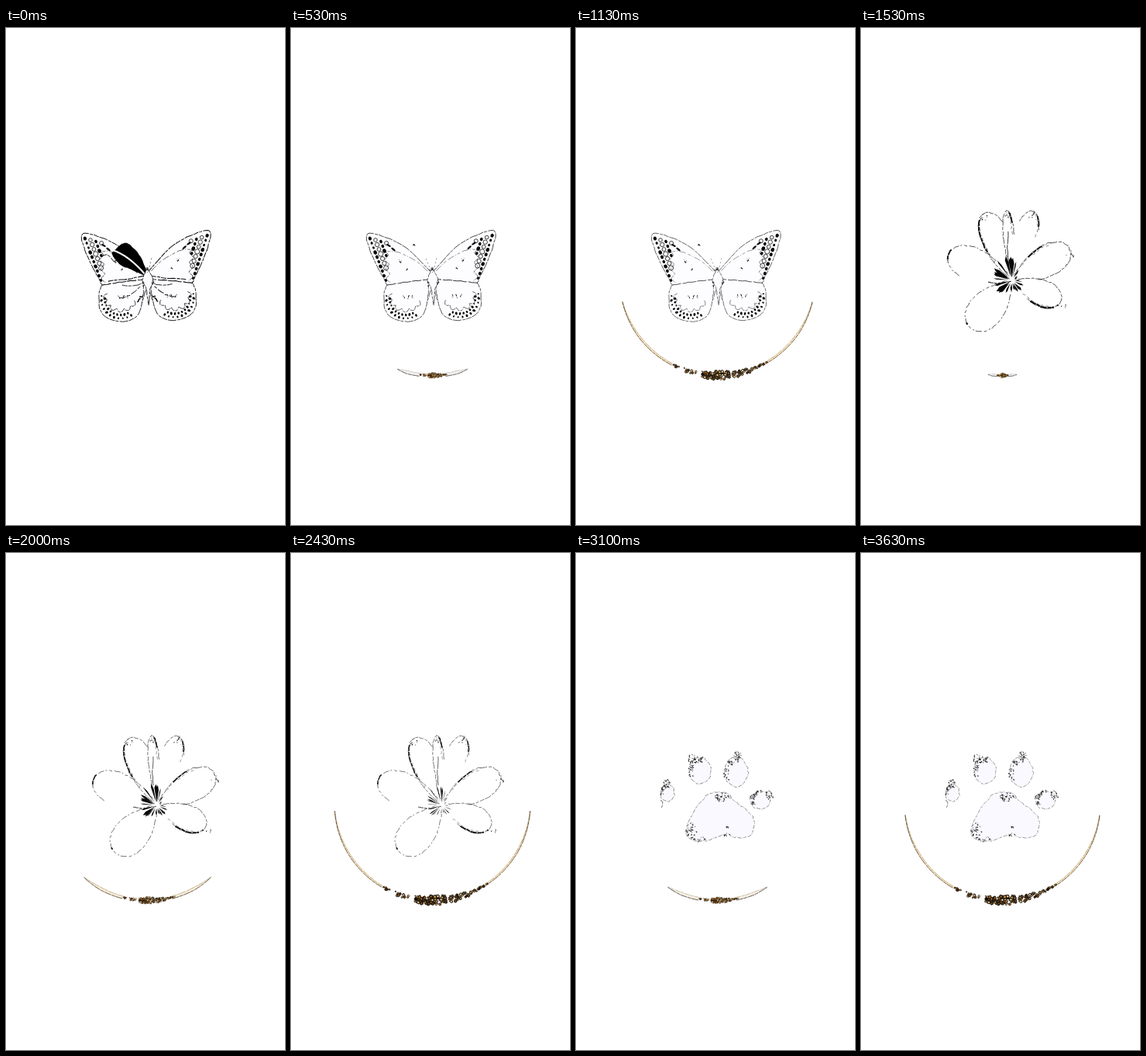
An HTML page that plays this animation: 360x640 px, repeating every 3.66 s.

```html
<!DOCTYPE html>
<html lang="en">
<head>
<meta charset="utf-8">
<title>Butterfly, flower, paw</title>
<style>
html, body { margin: 0; width: 100%; height: 100%; overflow: hidden; background: #fff; }
svg { display: block; width: 100vw; height: 100vh; }
.ink { fill: none; stroke: #111; stroke-linejoin: round; }
.bead { stroke: #1a1006; }
</style>
</head>
<body>
<svg id="stage" viewBox="0 0 360 640" xmlns="http://www.w3.org/2000/svg"></svg>
<script>
const LOOP = 3660, PART = LOOP / 3, TURN = Math.PI * 2;
const CX = 182.5, CY = 321, R = 126.5, SPAN = 86;

let seed = 11;
const rnd = () => (seed = (seed * 16807) % 2147483647) / 2147483647;
const spread = a => (rnd() * 2 - 1) * a;
const f = n => n.toFixed(1);
const mix = (a, b, t) => a + (b - a) * t;
const clamp = v => Math.max(0, Math.min(1, v));

// Path through n + 1 points given by a function of 0..1
function trace(point, n, rough = 0) {
  let d = '';
  for (let i = 0; i <= n; i++) {
    const [x, y] = point(i / n);
    d += (i ? 'L' : 'M') + f(x + spread(rough)) + ' ' + f(y + spread(rough));
  }
  return d;
}

// Slightly rough spline through a few key points
function curve(text, rough = 0.4) {
  const p = text.split(' ').map(s => s.split(',').map(Number)), n = p.length - 1;
  const at = i => p[Math.max(0, Math.min(n, i))];
  return trace(t => {
    const i = Math.min(n - 1, Math.floor(t * n)), u = t * n - i;
    const [a, b, c, e] = [at(i - 1), at(i), at(i + 1), at(i + 2)];
    return [0, 1].map(k => b[k] + 0.5 * u * (c[k] - a[k] + u * (2 * a[k] - 5 * b[k] + 4 * c[k] - e[k]
      + u * (3 * b[k] - a[k] - 3 * c[k] + e[k]))));
  }, n * 6, rough);
}

const ink = (d, w = 1, dash = '7 1 4 1.5 11 1', color = '#111') =>
  `<path class="ink" d="${d}" style="stroke:${color};stroke-width:calc(var(--w)*${w}px)" stroke-dasharray="${dash}"/>`;
const solid = (d, color = '#000') => `<path d="${d}" fill="${color}"/>`;
const spot = (x, y, rx, ry, rot = 0, open = false) =>
  `<ellipse transform="translate(${f(x)} ${f(y)}) rotate(${f(rot)})" rx="${f(rx)}" ry="${f(ry)}"`
  + (open ? ' class="ink" stroke-width=".8"/>' : ' fill="#080808"/>');

// Little marks scattered over an ellipse, or round its rim
function specks(cx, cy, rx, ry, n, rim = false) {
  let d = '';
  for (let i = 0; i < n; i++) {
    const a = rim ? 3.7 + spread(1.2) : rnd() * TURN, r = rim ? 0.9 + spread(0.22) : Math.sqrt(rnd());
    const w = 0.5 + rnd(), h = 0.5 + rnd() * 1.6;
    d += `M${f(cx + rx * r * Math.cos(a))} ${f(cy + ry * r * Math.sin(a))}h${f(w)}l${f(spread(0.8))} ${f(h)}h-${f(w)}z`;
  }
  return solid(d, '#222');
}

function wing() {
  const upper = curve('180,314 150,284 118,268 98,266 102,286 113,310 124,331');
  const lower = curve('124,331 120,344 124,368 147,378 169,371 177,349 180,338');
  let s = solid(upper + 'L180 324Z', '#fdfdff') + solid(lower + 'L178 325Z', '#fdfdff');
  s += ink(upper) + ink(lower, 0.9);
  s += ink(curve('124,331 150,327 177,324'), 1.1, '12 2 18 1');
  s += ink(curve('124,288 136,288 160,299 178,315'), 0.6, '4 2 1 2 9 3');
  s += ink(trace(t => [mix(123, 126, t) + 2.5 * Math.sin(t * 20), mix(289, 328, t)], 24, 0.3), 0.7);
  s += ink(curve('177,324 178,332 176,351'), 0.8);
  s += ink(trace(t => {
    const a = 0.3 + t * 3.1, r = 16 + 4 * Math.abs(Math.sin(t * Math.PI * 6));
    return [148 + (r + 2) * Math.cos(a), 346 + r * Math.sin(a)];
  }, 48, 0.3), 0.8);

  // Rows of dots and rings inside the outer margin
  for (let row = 0; row < 4; row++)
    for (let y = 271 + row * 2; y < 328; y += 6) {
      const x = 100 + (y - 266) * 0.38 + row * 6.3;
      if (x > (y < 283 ? 126 : 124)) continue;
      const r = 1.4 + rnd() * 0.9;
      s += row % 2 ? spot(x, y, r + 0.8, r + 0.8, 0, true) : spot(x, y, r, r * 1.2, -25);
    }
  s += spot(126, 280, 3.2, 1.2, 30) + spot(132, 285, 3.2, 1.2, 38);
  for (let row = 0; row < 2; row++)
    for (let a = 1 + row * 0.1; a < 3.4; a += 0.23) {
      const r = 25 - row * 4.5, size = 0.9 + rnd() * 0.8;
      s += spot(148 + r * Math.cos(a), 349 + r * Math.sin(a), size * 1.2, size * 0.9, a * 57 + spread(40));
    }
  return s + specks(141, 299, 2, 2, 4) + specks(150, 310, 3, 1.5, 4) + specks(152, 346, 9, 3, 10);
}

function butterfly() {
  const half = wing(), mirror = 'rotate(-2.7 182 322) matrix(-1 0 0 1 364 0)';
  const both = s => s + `<g transform="${mirror}">${s}</g>`;
  const veins = both(ink(curve('132,326 158,323 180,319'), 1.1) + ink(curve('150,331 163,332 177,329'), 0.9)
    + ink(curve('146,348 160,344 173,333'), 1, '9 2 4 2') + ink(curve('170,354 173,347 177,345', 0.8), 1.6))
    + ink(trace(t => [mix(124, 176, t), mix(294, 319, t) - 5 * Math.abs(Math.sin(t * 11))], 30, 0.3), 1);
  const lobe = solid(curve('136,290 148,279 158,278 174,295 181,318 162,311 146,304 136,290'))
    + '<path d="M137 286Q158 292 181 319" fill="none" stroke="#fff" stroke-width="2.2"/>';
  const body = curve('182,309 186,316 190,326 186,336 184,357 181,336 176,326 179,316 182,309');
  return both(half) + `<g id="veins">${veins}</g><g id="lobe">${lobe}</g>`
    + solid(body, '#fcfcff') + ink(body, 0.9) + specks(182, 311, 4, 3, 9) + specks(177, 328, 1.5, 4, 6) + specks(189, 328, 1.5, 4, 6)
    + ink('M179 308L174 297M185 308L188 296', 0.6, '2 3') + specks(158, 279, 1.5, 1, 3);
}

// Teardrop from the flower's heart to a tip; from..to picks a stretch of its outline
function petal(x, y, wide, from, to, rough = 0.7) {
  const dx = x - 195, dy = y - 325, len = Math.hypot(dx, dy);
  return trace(t => {
    const a = mix(from, to, t) * TURN, s = (1 - Math.cos(a)) / 2;
    const side = wide / 2 * Math.sin(a) * Math.pow(s, 0.4) / len;
    return [195 + dx * s - dy * side, 325 + dy * s + dx * side];
  }, Math.ceil((to - from) * 70), rough);
}

function flower() {
  // tip, width, drawn stretch, heavy stretch
  const petals = [
    [141, 386, 56, 0.1, 0.9, 0.45, 0.47], [113, 291, 52, 0.1, 0.68, 0.46, 0.55],
    [160, 238, 44, 0.35, 0.94, 0.58, 0.76], [188, 235, 17, 0.3, 0.9, 0.36, 0.45],
    [222, 236, 36, 0.34, 0.64, 0.36, 0.44], [269, 284, 50, 0.2, 0.92, 0.7, 0.79],
    [258, 352, 42, 0.22, 0.9, 0.24, 0.41]];
  let s = '';
  petals.forEach(([x, y, wide, a, b, c, e], i) => {
    s += ink(petal(x, y, wide, a, b), 0.85, i < 2 ? '4 3 2 2 8 3' : '9 1.5 4 2 6 1');
    s += ink(petal(x, y, wide - 1, c, e, 0.4), i === 6 ? 2.8 : 2.2, '8 1 5 1');
    if (i > 1) s += specks(x, y + 6, 6, 5, 7) + ink(petal(x, y, wide - 5, c - 0.06, e + 0.05, 1), 0.6, '4 3');
  });
  s += ink(curve('190,299 189,283 190,262'), 1, '20 1') + ink(curve('164,327 180,329 194,326'), 1.2);
  return s + '<path id="rays"/>';
}

function paw() {
  const pad = curve('180,308 195,309 204,319 228,339 226,363 204,366 193,362 168,371 143,366 148,340 168,313 180,308', 0.8);
  const shape = d => solid(d, '#f9f9ff') + ink(d, 0.75, '3 1 1 1.5 5 2', '#333');
  const ring = (x, y, rx, ry, rough) => trace(t => [x + rx * Math.cos(t * TURN), y + ry * Math.sin(t * TURN)], 26, rough);
  let s = shape(pad);
  // centre, radii, offset of the tuft
  for (const [x, y, rx, ry, tx, ty] of [[160, 280, 14, 17, -11, -16], [207, 282, 15, 19, 1, -21],
    [118, 309, 9, 11, -1, -12], [238, 318, 13, 12, 11, -7]]) {
    s += shape(ring(x, y, rx, ry, 0.9)) + ink(ring(x + tx, y + ty, 3.5, 5, 0.8), 0.7, '3 2');
    s += specks(x, y, rx, ry, rx * 3, true) + specks(x + tx, y + ty, 5, 6, 14);
  }
  s += ink(curve('109,318 112,322 110,329'), 0.8);
  return s + specks(189, 314, 11, 6, 42) + specks(148, 357, 7, 10, 34) + specks(160, 368, 10, 3, 12)
    + specks(194, 353, 2, 2, 5) + specks(194, 362, 4, 1.5, 9);
}

// Beads keep their fraction of the arc; the string is thickest near the middle and has two gaps
function makeBeads() {
  const colors = ['#1c1206', '#4a3216', '#7a5626', '#c69a55', '#96733c', '#655a4a', '#e6cc98', '#b5651d'];
  const list = [];
  while (list.length < 170) {
    const u = mix(-0.36, 0.42, rnd()), h = 0.6 + 5.2 * (1 - Math.abs(u - 0.02) / 0.42);
    if (Math.abs(u + 0.29) < 0.015 || Math.abs(u + 0.142) < 0.02 || rnd() * 6 > h) continue;
    list.push({ u, off: spread(h), size: 0.7 + rnd() * (0.4 + h * 0.17), rot: rnd() * 90,
      color: colors[Math.floor(rnd() * colors.length)] });
  }
  return list;
}

const stage = document.getElementById('stage');
const beads = makeBeads();
stage.innerHTML = '<rect width="360" height="640" fill="#fff"/>'
  + [butterfly, flower, paw].map((draw, i) => `<g id="pic${i}">${draw()}</g>`).join('')
  + '<g id="arc"><path id="band"/><path id="rimIn" class="ink"/><path id="rimOut" class="ink"/>'
  + beads.map(b => `<path class="bead" d="M-1-.6L.2-1L1-.2L.6.9L-.6.8Z" fill="${b.color}"/>`).join('') + '</g>';
const $ = id => document.getElementById(id);
const pics = [0, 1, 2].map(i => $('pic' + i));
const beadEls = [...document.querySelectorAll('.bead')];
const set = (el, attrs) => { for (const k in attrs) el.setAttribute(k, attrs[k]); };
const show = (el, on) => { el.style.display = on ? '' : 'none'; };
const polar = (deg, r) => {
  const a = deg * Math.PI / 180;
  return (CX + r * Math.sin(a)).toFixed(2) + ' ' + (CY + r * Math.cos(a)).toFixed(2);
};

function drawArc(p) {
  const g = Math.pow(p, 1.7), angle = SPAN * g, thick = Math.min(4.6 - 2.8 * g, angle * 0.3);
  let fill = '', inner = '', outer = '';
  for (const [a, b] of [[-0.365, -1], [0.36, 1]]) {
    const top = [], low = [];
    for (let i = 0; i <= 24; i++) {
      const u = mix(a, b, i / 24), w = thick * Math.min(1, 0.15 + (1 - Math.abs(u)) * 3) / 2;
      top.push(polar(u * angle, R - w));
      low.push(polar(u * angle, R + w));
    }
    inner += 'M' + top.join('L');
    outer += 'M' + low.join('L');
    fill += 'M' + top.concat(low.reverse()).join('L') + 'Z';
  }
  const warm = clamp(g * 2.4 - 0.5);
  const tint = (from, ...to) => `rgb(${to.map(c => Math.round(mix(from, c, warm)))})`;
  set($('band'), { d: fill, fill: tint(242, 255, 236, 200) });
  set($('rimIn'), { d: inner, style: `stroke:${tint(170, 150, 108, 50)};stroke-width:.6`, 'stroke-dasharray': '7 1 4 .5' });
  set($('rimOut'), { d: outer, style: `stroke:${tint(40, 60, 42, 18)};stroke-width:.75`, 'stroke-dasharray': '9 .6 5 .8' });
  const size = 0.5 + 0.65 * g, lift = 0.4 + 0.6 * g;
  $('arc').style.strokeWidth = 0.1 + 0.4 * g;
  beads.forEach((b, i) => set(beadEls[i], { transform:
    `translate(${polar(b.u * angle, R + b.off * lift)}) rotate(${f(b.rot + angle * b.off)}) scale(${(b.size * size).toFixed(2)})` }));
  show($('arc'), angle > 1);
}

// Dark uneven wedges round the flower's heart, longest upwards
function drawRays(p) {
  const thin = clamp((p - 0.5) / 0.5), long = 1.25 - 0.3 * p;
  let d = '';
  for (let i = 0; i < 26; i++) {
    const a = i / 26 * TURN + 0.13 * Math.sin(i * 5), wide = mix(0.085, 0.03, thin) * (1 + 0.5 * Math.sin(i * 11));
    const up = Math.max(0, -Math.sin(a + 0.4));
    const r = (9 + 16 * up * up + 7 * Math.max(0, -Math.cos(a)) + 5 * Math.max(0, Math.sin(a)) + 3 * Math.sin(i * 7)) * long;
    const at = (q, k) => f(194.5 + k * Math.cos(q)) + ' ' + f(325 + k * Math.sin(q));
    d += `M${at(a, 4)}L${at(a - wide, r * 0.85)}L${at(a, r)}L${at(a + wide, r * 0.75)}Z`;
  }
  set($('rays'), { d, fill: '#080808' });
}

function render(ms) {
  const t = ms % LOOP, part = Math.min(2, Math.floor(t / PART)), p = (t - part * PART) / PART;
  pics.forEach((g, i) => show(g, i === part));
  stage.style.setProperty('--w', (0.65 + 0.35 * (1 - p) ** 2).toFixed(3));
  if (part === 0) {
    const k = clamp(1 - (t - 70) / 330);
    set($('lobe'), { transform: `translate(181 318) scale(${k.toFixed(3)}) translate(-181 -318)` });
    $('veins').style.setProperty('--w', k.toFixed(3));
    show($('veins'), k > 0);
  }
  if (part === 1) drawRays(p);
  drawArc(p);
}

const start = performance.now();
function tick() {
  render(performance.now() - start);
  requestAnimationFrame(tick);
}
tick();
</script>
</body>
</html>
```
